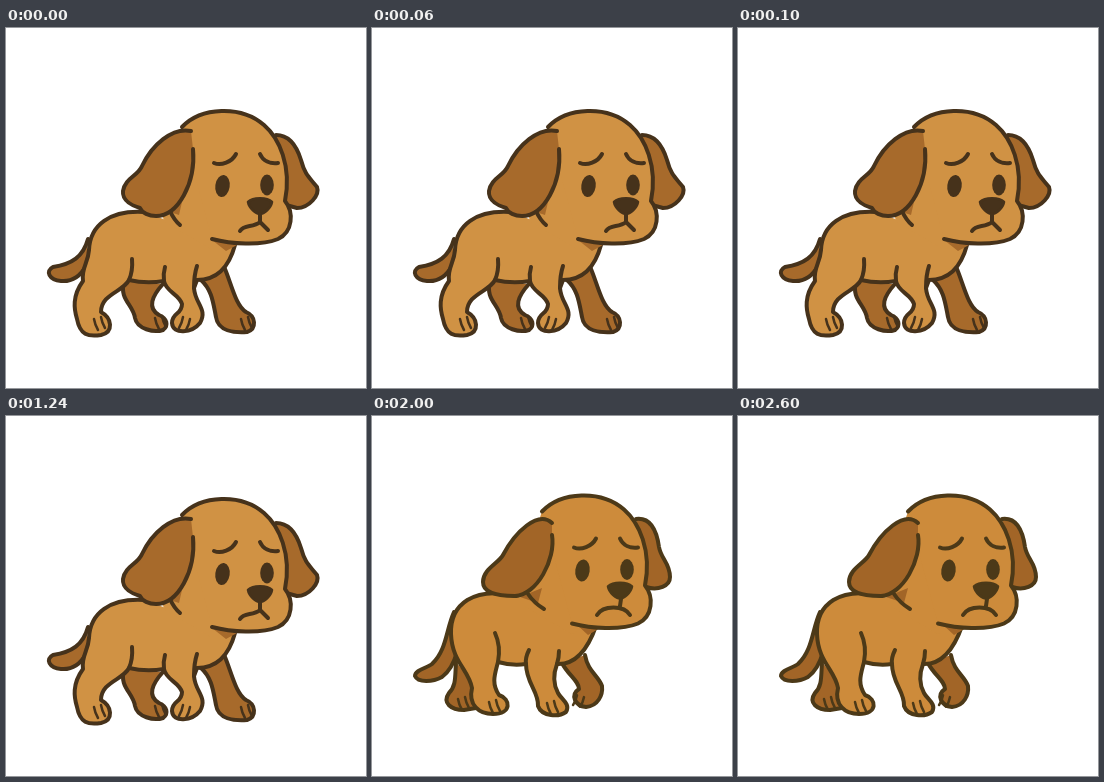
An HTML page that plays this animation: 360x360 px, repeating every 3 s.

```html
<!DOCTYPE html>
<html lang="en">
<head>
<meta charset="utf-8">
<title>Sad puppy</title>
<style>
  html, body { margin: 0; width: 100%; height: 100%; overflow: hidden; background: #fff; }
  svg { display: block; width: 100vw; height: 100vh; }
  path { stroke: var(--ink); stroke-width: 4; stroke-linecap: round; stroke-linejoin: round; fill: none; }
  .coat { fill: var(--coat); }
  .dark { fill: var(--dark); }
  .ink { fill: var(--ink); }
  .flat { stroke: none; }
  .thin { stroke-width: 2.5; }
  .step { --coat: #d09244; --dark: #a76a2b; --ink: #46321b; animation: first 3s step-end infinite; }
  .stand { --coat: #cd8b3b; --dark: #a26527; --ink: #4c3918; opacity: 0; animation: second 3s step-end infinite; }
  .stand .moved { transform: translate(-6px, -3.5px); }
  @keyframes first { 0% { opacity: 1; } 66.6667%, 100% { opacity: 0; } }
  @keyframes second { 0% { opacity: 0; } 66.6667%, 100% { opacity: 1; } }
</style>
</head>
<body>
<svg viewBox="0 0 360 360">
  <defs>
    <path id="toes" class="thin" d="M0 0q1 6 4 11M7-2q1 6 4 11"/>
    <path id="neck" class="coat flat" d="M176 99L150 178L160 195L206 222L240 200Z"/>
    <path id="head" class="coat" d="M176 99C195 79 235 77 258 97C273 110 286 138 279 173C288 184 287 204 272 211C255 218 225 216 206 211"/>
    <g id="face">
      <ellipse class="ink" cx="216.5" cy="158" rx="7.2" ry="11" transform="rotate(8 216.5 158)"/>
      <ellipse class="ink" cx="261" cy="157" rx="6.8" ry="10.4"/>
      <path d="M208 135C215 138 226 134 230 126M254 126C257 133 264 136 272 135"/>
      <path class="ink thin" d="M242 174C247 169 261 169 266 174C265 180 258 186 254 186C250 186 243 180 242 174Z"/>
    </g>
  </defs>

  <g class="step">
    <path class="dark" d="M82 211C77 229 66 236 47 239C39 243 43 252 55 253C67 254 75 247 80 238"/>
    <path class="dark" d="M118 253C113 272 127 276 129 290C131 301 148 305 157 302C163 298 161 290 153 287C141 280 146 268 157 256"/>
    <path class="dark" d="M195 252C206 262 207 274 210 289C212 303 228 305 241 304C251 301 250 288 240 284C230 278 226 258 219 241"/>
    <path class="coat" d="M138 184C104 182 84 197 83 222C82 236 75 240 77 253C66 268 68 281 71 291C74 307 82 309 95 307C108 304 106 290 95 284C95 266 117 264 123 252Q140 256 158 253C160 264 173 266 176 276C176 287 166 284 166 295C167 307 186 305 194 295C202 281 189 276 188 260L191 252C207 252 222 243 229 217"/>
    <use href="#neck"/>
    <path class="dark flat" d="M206 212L231 217L220 223ZM164 184L176 174L173 187Z"/>
    <path d="M126 231Q127 243 123 252M159 239Q157 246 158 253M191 238Q188 247 188 260M164 183Q168 192 174 197"/>
    <use href="#toes" x="88" y="291"/>
    <use href="#toes" x="149" y="290"/>
    <use href="#toes" x="235" y="291"/>
    <use href="#toes" transform="translate(184 291) scale(-1 1)"/>
    <path class="dark" d="M270 107C284 107 291 119 295 132C299 147 303 149 311 159C314 167 303 180 291 180L280 177"/>
    <use href="#head"/>
    <path class="dark" d="M185 103C166 99 146 117 136 138C132 148 119 150 117 163C116 173 127 178 134 180C136 185 143 188 150 188C172 188 190 155 187 121"/>
    <use href="#face"/>
    <path d="M254 186V194C247 200 238 196 234 203M254 194L262 202"/>
  </g>

  <g class="stand">
    <path class="dark" d="M82 196C74 213 75 234 60 248C55 252 43 254 43 260C46 267 61 266 70 261C78 255 82 247 85 236"/>
    <path class="dark" d="M84 246C83 262 84 270 77 277C70 287 79 294 92 294L104 292L99 264"/>
    <path class="dark" d="M190 247C196 259 207 265 207 273C198 279 203 290 214 291C226 290 231 279 230 270C226 259 216 256 213 239"/>
    <path class="coat" d="M144 180C102 170 78 188 79 218C80 246 97 254 100 272C96 289 107 298 121 298C140 298 139 283 127 279C119 267 123 258 126 246Q140 250 154 248C154 267 167 276 166 290C170 301 187 301 194 296C199 288 189 283 186 277C180 266 182 256 185 248C206 249 217 230 224 210"/>
    <use class="moved" href="#neck"/>
    <path class="dark flat" d="M203 207L228 212L216 219ZM148 181L170 172L166 187Z"/>
    <path d="M123 217Q129 230 126 246M157 234Q153 242 154 248M187 235Q187 242 185 248M156 178Q162 187 172 193"/>
    <use href="#toes" x="117" y="286"/>
    <use href="#toes" x="175" y="287"/>
    <use href="#toes" transform="translate(212 281) scale(-1 .9)"/>
    <use href="#toes" x="86" y="283"/>
    <path class="dark" d="M264 103C280 101 285 117 287 131C289 143 298 147 298 161C298 170 286 175 274 171"/>
    <use class="moved" href="#head"/>
    <path class="dark" d="M180 107C166 94 143 116 131 139C127 147 111 153 111 166C111 178 128 180 143 180C165 179 184 143 180 119"/>
    <use class="moved" href="#face"/>
    <path d="M249 183L248 190M225 199C231 189 252 189 258 199"/>
  </g>
</svg>
</body>
</html>
```
